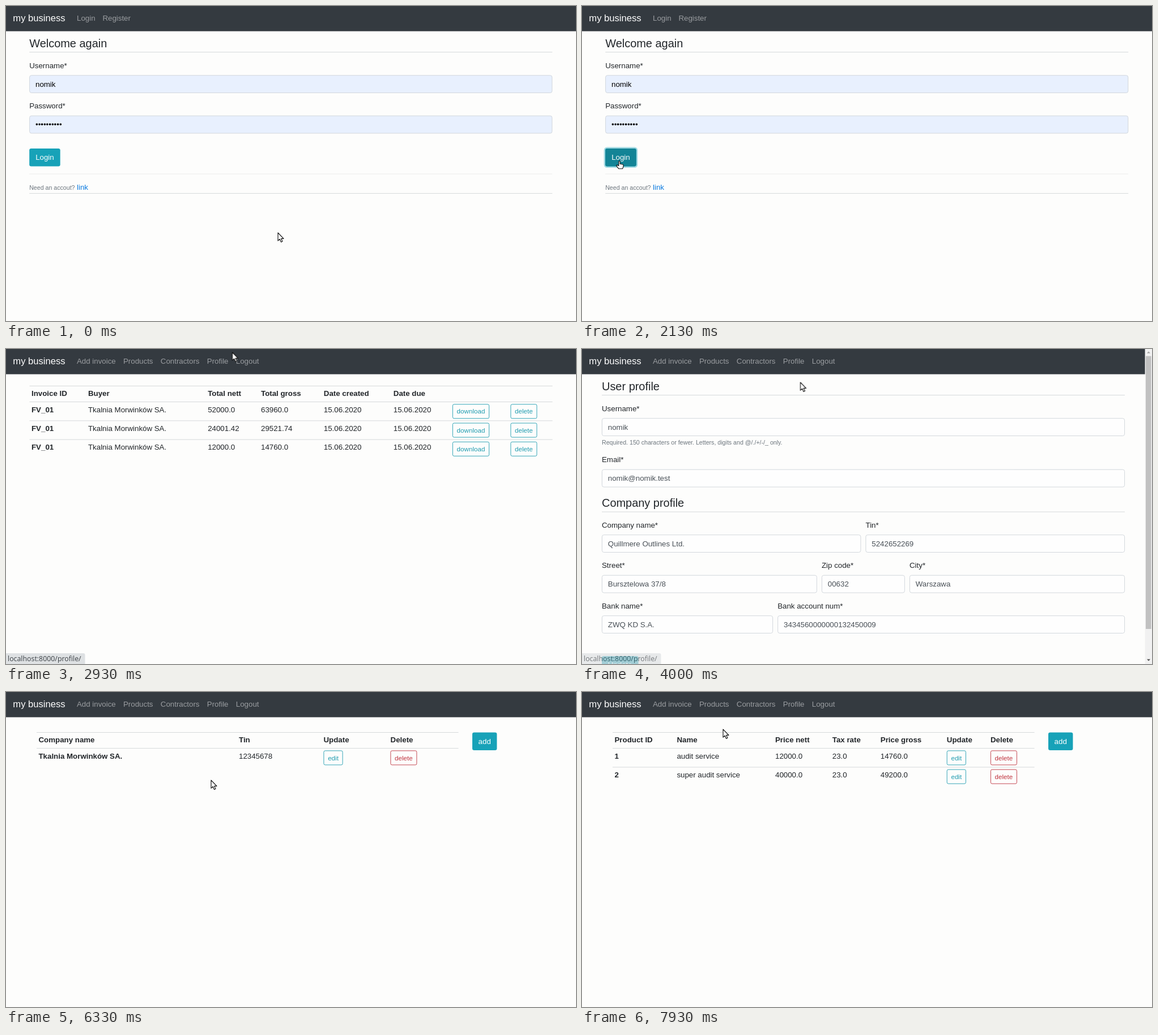
Write an HTML page that moves like this. It is 1006x557 px and loops after 8 s.

```html
<!DOCTYPE html>
<html lang="en">
<head>
<meta charset="utf-8">
<title>my business</title>
<style>
html, body { margin: 0; width: 100%; height: 100%; overflow: hidden; background: #fdfdfc; }
svg { display: block; width: 100vw; height: 100vh; font: 13.3px "Liberation Sans", Arial, sans-serif; fill: #212529; }
text { white-space: pre; }
.brand { font-size: 16.63px; fill: #fff; }
.nav { fill: #9a9da0; }
.title { font-size: 19.96px; }
.small { font-size: 10.64px; fill: #6c757d; }
.link { fill: #0c7be0; }
.bold { font-weight: bold; }
.value { fill: #495057; }
.filled { fill: #000; }
.white { fill: #fff; }
.mid { text-anchor: middle; }
.input { fill: #fefefe; stroke: #ced4da; stroke-width: .9; }
.auto { fill: #e8f0fe; }
.solid { fill: #17a2b8; }
.outline { fill: none; stroke-width: .9; }
.info { font-size: 11.64px; fill: #1f9cb0; }
.danger { font-size: 11.64px; fill: #c0343f; }
.outline.info { fill: none; stroke: #1f9cb0; }
.outline.danger { fill: none; stroke: #c0343f; }
.rule { stroke: #d6d9db; stroke-width: 1; }
.faint { stroke: #ebecec; }
.status rect { fill: #dee1e3; }
.status text { font: 12.37px "Open Sans", "Noto Sans", sans-serif; fill: #3c4146; }

.page, .status, #hand, #arrow, #press, #ring, #hover { animation: 8s step-end infinite; }
#login { animation-name: login; }
#invoices { animation-name: invoices; }
#profile { animation-name: profile; }
#contractors { animation-name: contractors; }
#products { animation-name: products; }
@keyframes login { 0% { opacity: 1 } 27.5%, 100% { opacity: 0 } }
@keyframes invoices { 0% { opacity: 0 } 27.5% { opacity: 1 } 42.5%, 100% { opacity: 0 } }
@keyframes profile { 0% { opacity: 0 } 42.5% { opacity: 1 } 65%, 100% { opacity: 0 } }
@keyframes contractors { 0% { opacity: 0 } 65% { opacity: 1 } 91.25%, 100% { opacity: 0 } }
@keyframes products { 0% { opacity: 0 } 91.25%, 100% { opacity: 1 } }

#press { fill: #138496; animation-name: press; }
#ring { fill: #a2d9e2; animation-name: ring; }
@keyframes press { 0% { opacity: 0 } 19.125%, 100% { opacity: 1 } }
@keyframes ring { 0% { opacity: 0 } 25%, 100% { opacity: 1 } }

#nav-Profile { animation: nav-profile 8s step-end infinite; }
#nav-Contractors { animation: nav-contractors 8s step-end infinite; }
#nav-Products { animation: nav-products 8s step-end infinite; }
@keyframes nav-profile { 33.75%, 39.125% { fill: #cdced0 } 0%, 36%, 46.25%, 100% { fill: #9a9da0 } }
@keyframes nav-contractors { 56.625% { fill: #cdced0 } 0%, 68.75%, 100% { fill: #9a9da0 } }
@keyframes nav-products { 86.25% { fill: #cdced0 } 0%, 95%, 100% { fill: #9a9da0 } }

#to-profile { animation-name: to-profile; }
#to-contractors { animation-name: to-contractors; }
#to-products { animation-name: to-products; }
@keyframes to-profile { 0% { opacity: 0 } 34.125% { opacity: 1 } 49.9% { opacity: .7 } 51.625%, 100% { opacity: 0 } }
@keyframes to-contractors { 0% { opacity: 0 } 57.5% { opacity: 1 } 71.625%, 100% { opacity: 0 } }
@keyframes to-products { 0% { opacity: 0 } 86.625% { opacity: 1 } 96.625%, 100% { opacity: 0 } }

#cursor { animation: move 8s steps(2) infinite; }
#cursor path { fill: #fff; stroke: #111; stroke-width: 1.15; stroke-linejoin: round; }
#hand { animation-name: hand; }
#arrow { animation-name: arrow; }
@keyframes hand {
  0%, 27.5%, 36%, 46.25%, 68.75%, 95%, 100% { opacity: 0 }
  19.125%, 33.75%, 39.125%, 56.625%, 86.25% { opacity: 1 }
}
@keyframes arrow {
  0%, 27.5%, 36%, 46.25%, 68.75%, 95%, 100% { opacity: 1 }
  19.125%, 33.75%, 39.125%, 56.625%, 86.25% { opacity: 0 }
}
@keyframes move {
  0%, 1.25% { transform: translate(480px, 401px) }
  5% { transform: translate(440px, 393px) }
  7.5% { transform: translate(360px, 370px) }
  10% { transform: translate(262px, 338px) }
  12.5% { transform: translate(176px, 308px) }
  15% { transform: translate(114px, 289px) }
  17.5% { transform: translate(80px, 279px) }
  20%, 30% { transform: translate(66px, 274px) }
  32.5% { transform: translate(235px, 130px) }
  35% { transform: translate(375px, 22px) }
  36.5%, 37.5% { transform: translate(399.5px, 6px) }
  40%, 45% { transform: translate(374px, 21px) }
  47.5% { transform: translate(378px, 36px) }
  50%, 52.5% { transform: translate(385.5px, 59px) }
  55% { transform: translate(346px, 39px) }
  57.5%, 67.5% { transform: translate(312.5px, 22.5px) }
  70% { transform: translate(328px, 70px) }
  72.5% { transform: translate(350px, 130px) }
  75%, 81.25% { transform: translate(362px, 156px) }
  83.75% { transform: translate(300px, 90px) }
  86.25%, 95% { transform: translate(233px, 22px) }
  97.5% { transform: translate(244px, 50px) }
  98.75%, 100% { transform: translate(249px, 66px) }
}
</style>
</head>
<body>
<svg id="stage" viewBox="0 0 1006 557"></svg>
<script>
const BUYER = 'Tkalnia Morwinków SA.';
const USER = 'nomik';

const text = (x, y, s, cls = '', id = '') => `<text x="${x}" y="${y}" class="${cls}" id="${id}">${s}</text>`;
const box = (x, y, w, h, cls, r = 3.3) => `<rect x="${x}" y="${y}" width="${w}" height="${h}" rx="${r}" class="${cls}"/>`;
const rule = (x1, x2, y, cls = '') => `<path d="M${x1} ${y}H${x2}" class="rule ${cls}"/>`;
const page = (id, ...parts) => `<g id="${id}" class="page">${parts.flat().join('')}</g>`;

const bar = box(0, 0, 1006, 44.6, '" fill="#343a40', 0) + text(12.3, 27, 'my business', 'brand');
const menu = bar + [[125, 'Add invoice'], [207, 'Products'], [272.8, 'Contractors'], [354.8, 'Profile'], [405.8, 'Logout']]
  .map(([x, s]) => `<text x="${x}" y="25.8" class="nav" data-nav="${s}">${s}</text>`).join('');

const heading = (x, y, s) => text(x, y, s, 'title') + rule(x, x + 923, y + 8.6);
const field = (x, y, w, label, value, auto) =>
  text(x, y, label) + box(x + .4, y + 12.8, w - .8, 30.8, auto ? 'input auto' : 'input') +
  text(x + 10.8, y + 32.8, value, auto ? 'filled' : 'value');
const solid = (x, y, w, s) => box(x, y, w, 31.6, 'solid') + text(x + w / 2, y + 20.4, s, 'white mid');
const outline = (x, y, w, s, tone = 'info') =>
  box(x + .4, y + .4, w - .8, 25, 'outline ' + tone, 2.4) + text(x + w / 2, y + 17, s, 'mid ' + tone);
const cells = (xs, y, words, boldCount) => words.map((s, i) => text(xs[i], y, s, i < boldCount ? 'bold' : '')).join('');

function table(left, right, top, xs, head, rows, actions) {
  const body = rows.map((row, i) => {
    const y = top + 28.2 + i * 33.25;
    return cells(xs, y + 18, row, 1) + actions(y + 3.8) + (i ? rule(left, right, y) : '');
  });
  return rule(left, right, top) + cells(xs, top + 17.7, head, head.length) +
    rule(left, right, top + 28.1) + body.join('');
}

const login = page('login', bar,
  text(125, 25.8, 'Login', 'nav'), text(170.4, 25.8, 'Register', 'nav'),
  heading(41.2, 73, 'Welcome again'),
  field(41.2, 109.9, 923, 'Username*', USER, true),
  field(41.2, 181.4, 923, 'Password*', '•'.repeat(10), true),
  `<rect id="ring" x="38.7" y="249.5" width="59.5" height="36.6" rx="5.5"/>`,
  box(41.2, 252, 54.5, 31.6, 'solid'),
  `<rect id="press" x="41.2" y="252" width="54.5" height="31.6" rx="3.3"/>`,
  text(68.4, 272.4, 'Login', 'white mid'),
  rule(41.2, 964.2, 297, 'faint'),
  text(41.2, 325, 'Need an accout?', 'small'), text(125, 325, 'link', 'link'),
  rule(41.2, 964.2, 331.4));

const date = '15.06.2020';
const invoices = page('invoices', menu,
  table(41.5, 964.5, 65.4, [45, 145, 356.2, 450, 560.8, 683.8],
    ['Invoice ID', 'Buyer', 'Total nett', 'Total gross', 'Date created', 'Date due'],
    [['52000.0', '63960.0'], ['24001.42', '29521.74'], ['12000.0', '14760.0']]
      .map(sums => ['FV_01', BUYER, ...sums, date, date]),
    y => outline(788, y, 65, 'download') + outline(890.5, y, 46.8, 'delete')));

const scrollbar = `<path d="M993.6 0h12.4v557h-12.4z" fill="#f1f1f1"/><path d="M995 12.5h9.6v482.5h-9.6z" fill="#c1c1c1"/>
  <path d="M997 7.5h6l-3-3.3z" fill="#a3a3a3"/><path d="M997 548.5h6l-3 3.3z" fill="#505050"/>`;

const profile = page('profile', menu,
  heading(35, 73, 'User profile'),
  field(35, 109.9, 923, 'Username*', USER),
  text(35, 169, 'Required. 150 characters or fewer. Letters, digits and @/./+/-/_ only.', 'small'),
  field(35, 200.4, 923, 'Email*', USER + '@nomik.test'),
  heading(35, 279.4, 'Company profile'),
  field(35, 315.9, 457.3, 'Company name*', 'Quillmere Outlines Ltd.'),
  field(500.5, 315.9, 457.5, 'Tin*', '5242652269'),
  field(35, 387.4, 379.8, 'Street*', 'Bursztelowa 37/8'),
  field(423, 387.4, 146.8, 'Zip code*', '00632'),
  field(578, 387.4, 380, 'City*', 'Warszawa'),
  field(35, 458.9, 302, 'Bank name*', 'ZWQ KD S.A.'),
  field(345.2, 458.9, 612.8, 'Bank account num*', '3434560000000132450009'),
  solid(35, 543, 64.5, 'Update'), scrollbar);

const editable = (edit, del) => y => outline(edit, y, 34, 'edit') + outline(del, y, 46.8, 'delete', 'danger');
const contractors = page('contractors', menu,
  table(54, 798.5, 71.5, [57.5, 411, 560.5, 678.6],
    ['Company name', 'Tin', 'Update', 'Delete'], [[BUYER, '12345678']], editable(560.5, 678.5)),
  solid(823, 71.5, 43.4, 'add'));

const products = page('products', menu,
  table(54, 798.5, 71.5, [57.5, 167.4, 341, 441.8, 526.8, 643.8, 721],
    ['Product ID', 'Name', 'Price nett', 'Tax rate', 'Price gross', 'Update', 'Delete'],
    [['1', 'audit service', '12000.0', '23.0', '14760.0'], ['2', 'super audit service', '40000.0', '23.0', '49200.0']],
    editable(643.8, 721)),
  solid(823, 71.5, 43.4, 'add'));

const status = (id, w, path) => `<g id="${id}" class="status"><rect x="-4" y="538" width="${w + 4}" height="24" rx="3"/>${text(3, 552, 'localhost:8000/' + path)}</g>`;

const cursor = `<g id="cursor">
  <path id="arrow" d="M0 0V14.2L3.2 11.2L5.6 16.4L7.9 15.3L5.6 10.3H10Z"/>
  <path id="hand" d="M-1.2 8.6V1.2a1.2 1.2 0 0 1 2.4 0V5.2l4.4.8q1.7.4 1.5 2.2l-.5 3-1.1 2.6H-1.2L-4.9 9.2q-.8-1.3.4-1.8 1.4-.3 3.3 1.2Z"/></g>`;

const stage = document.getElementById('stage');
stage.innerHTML = login + invoices + profile + contractors + products +
  status('to-profile', 139.5, 'profile/') + status('to-contractors', 162.5, 'contractors') +
  status('to-products', 146, 'products') + cursor;

const hovers = { Profile: 'nav-profile', Contractors: 'nav-contractors', Products: 'nav-products' };
for (const el of stage.querySelectorAll('[data-nav]')) {
  const name = hovers[el.dataset.nav];
  if (name) el.style.animation = `${name} 8s step-end infinite`;
}
</script>
</body>
</html>
```
